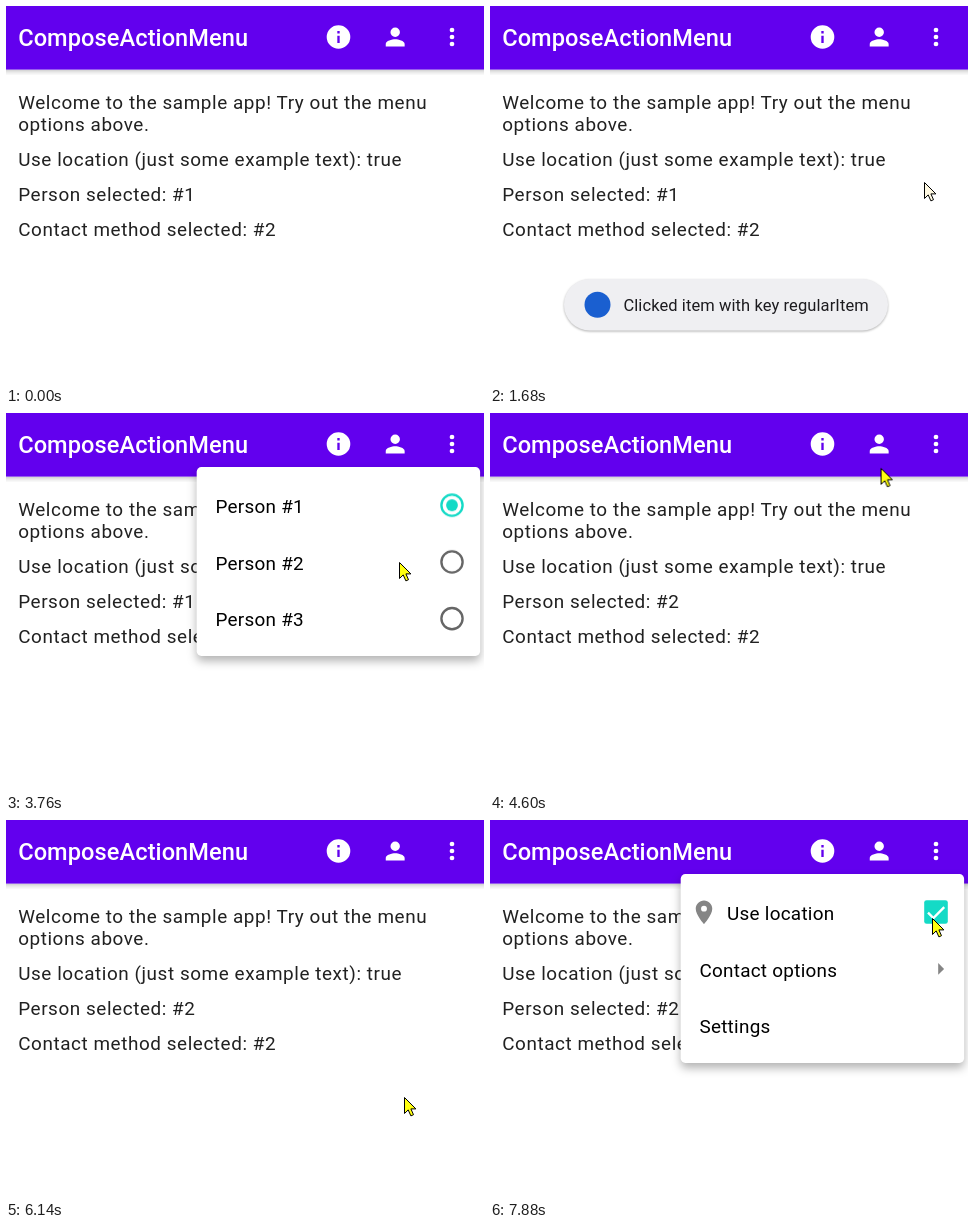
An HTML page for the animation above (8000 ms loop, 478x379 px).

```html
<!DOCTYPE html>
<html lang="en">
<head>
<meta charset="utf-8">
<title>Action menu demo</title>
<style>
  html, body { margin: 0; width: 100%; height: 100%; overflow: hidden; background: #fff; }
  svg { display: block; width: 478px; height: 379px; }

  text { font: 400 18.9px Roboto, sans-serif; letter-spacing: .27px; }
  .title { font-size: 23.6px; font-weight: 500; letter-spacing: .05px; fill: #fff; }
  .body text { letter-spacing: .57px; fill: #212121; }
  .toast text { font-size: 16.5px; letter-spacing: .09px; fill: #1c1b1f; }
  .panel { fill: #fff; filter: drop-shadow(0 5px 5px rgba(0, 0, 0, .3)); }

  /* One loop is 8 s, so 1% of a keyframe list is 80 ms. */
  .cursor, .toast, .menu, .halo, .glow { animation: 8s linear infinite; }
  .before, .after, .on1, .on2, .off1, .off2 { animation: 8s step-end infinite; }

  .cursor { animation-name: cursor; animation-timing-function: ease-in-out; }
  @keyframes cursor {
    0% { transform: translate(432px, 347px); opacity: 0; fill: #fff9e2; animation-timing-function: step-end; }
    .875% { transform: translate(432px, 347px); opacity: 1; }
    10%, 15.4% { transform: translate(328px, 27px); }
    20.6% { transform: translate(434px, 176px); }
    22.4% { transform: translate(434px, 176px); fill: #fff9e2; }
    22.6% { fill: #ffff10; }
    31.25% { transform: translate(385px, 33px); }
    34.5%, 42.25% { transform: translate(392px, 42.5px); }
    46.5%, 53.75% { transform: translate(393px, 149px); }
    59%, 61.2% { transform: translate(390px, 36px); }
    65.3%, 69% { transform: translate(396px, 217px); }
    73.25%, 77.25% { transform: translate(398px, 277px); }
    85%, 93.1% { transform: translate(443px, 32px); }
    97.75%, 100% { transform: translate(442px, 98px); opacity: 1; fill: #ffff10; }
  }

  .toast { opacity: 0; animation-name: toast; }
  @keyframes toast {
    0%, 13.6% { opacity: 0; }
    17%, 41.2% { opacity: 1; }
    45%, 100% { opacity: 0; }
  }

  .menu { opacity: 0; }
  .people { transform-origin: 389px 54px; animation-name: people; }
  @keyframes people {
    0%, 34% { opacity: 0; transform: scale(.8); }
    34.4% { opacity: 1; }
    35.5%, 52.25% { opacity: 1; transform: none; }
    53.2% { opacity: 0; transform: none; }
    53.3%, 60.75% { opacity: 0; transform: scale(.8); }
    61.15% { opacity: 1; }
    62.25%, 75.6% { opacity: 1; transform: none; }
    76.5%, 100% { opacity: 0; transform: none; }
  }
  .overflow { transform-origin: 474px 54px; animation-name: overflow; }
  @keyframes overflow {
    0%, 87.25% { opacity: 0; transform: scale(.8); }
    87.65% { opacity: 1; }
    88.75%, 100% { opacity: 1; transform: none; }
  }

  /* Selection moves from person 1 to person 2. */
  .before, .on1, .off2 { animation-name: leave; }
  .after, .on2, .off1 { animation-name: enter; }
  @keyframes leave { 0% { opacity: 1; } 52.25%, 100% { opacity: 0; } }
  @keyframes enter { 0% { opacity: 0; } 52.25%, 100% { opacity: 1; } }

  /* Ripples share one timeline and are delayed to their click. */
  .halo, .glow { opacity: 0; animation-delay: var(--at); transform-box: fill-box; transform-origin: center; }
  .halo { fill: #fff; animation-name: halo; }
  .glow { fill: url(#soft); animation-name: glow; }
  @keyframes halo {
    0%, .7% { opacity: 0; }
    2.4%, 5.7% { opacity: .12; }
    8.6%, 100% { opacity: 0; }
  }
  @keyframes glow {
    0% { opacity: 0; transform: scale(.35); }
    .8% { opacity: 1; transform: scale(.66); }
    2.6% { opacity: .5; transform: none; }
    4.7%, 100% { opacity: 0; transform: none; }
  }
</style>
</head>
<body>
<svg viewBox="0 0 478 379">
  <defs>
    <linearGradient id="edge" x2="0" y2="1">
      <stop stop-opacity=".2"/>
      <stop offset=".4" stop-opacity=".09"/>
      <stop offset="1" stop-opacity="0"/>
    </linearGradient>
    <radialGradient id="soft">
      <stop stop-color="#fff" stop-opacity=".32"/>
      <stop offset=".6" stop-color="#fff" stop-opacity=".23"/>
      <stop offset="1" stop-color="#fff" stop-opacity="0"/>
    </radialGradient>
    <circle id="ring" r="10.6" fill="none" stroke="#666" stroke-width="2.36"/>
    <g id="picked">
      <circle r="10.6" fill="none" stroke="#14dac6" stroke-width="2.36"/>
      <circle r="5.9" fill="#14dac6"/>
    </g>
    <rect id="panel" class="panel" x="190.7" y="54" width="283.4" height="188.9" rx="4.7"/>
  </defs>

  <g class="body">
    <text x="12.2" y="103">Welcome to the sample app! Try out the menu</text>
    <text x="12.2" y="125">options above.</text>
    <text x="12.2" y="160">Use location (just some example text): true</text>
    <text class="before" x="12.2" y="195">Person selected: #1</text>
    <text class="after" x="12.2" y="195">Person selected: #2</text>
    <text x="12.2" y="230">Contact method selected: #2</text>
  </g>

  <rect y="63.6" width="478" height="6" fill="url(#edge)"/>
  <rect width="478" height="63.6" fill="#6200ee"/>
  <text class="title" x="12.2" y="39.7">ComposeActionMenu</text>

  <g style="--at: .95s">
    <circle class="halo" cx="332.5" cy="31" r="28.3"/>
    <circle class="glow" cx="332.5" cy="31" r="28.3"/>
  </g>
  <g style="--at: 2.64s">
    <circle class="halo" cx="389.2" cy="31" r="28.3"/>
    <circle class="glow" cx="389.2" cy="31" r="28.3"/>
  </g>
  <g style="--at: 4.79s">
    <circle class="halo" cx="389.2" cy="31" r="28.3"/>
    <circle class="glow" cx="389.2" cy="31" r="28.3"/>
  </g>
  <g style="--at: 6.83s">
    <circle class="halo" cx="446" cy="31" r="28.3"/>
    <circle class="glow" cx="446" cy="31" r="28.3"/>
  </g>

  <g fill="#fff">
    <path transform="translate(332.5 31) scale(1.181)" fill-rule="evenodd"
      d="M0-10a10 10 0 1 0 0 20a10 10 0 1 0 0-20zM-1-1h2v6h-2zM-1-5h2v2h-2z"/>
    <path transform="translate(389.2 31) scale(1.181)"
      d="M0 0a4 4 0 1 0 0-8a4 4 0 1 0 0 8zM0 2c-2.67 0-8 1.34-8 4v2h16v-2c0-2.66-5.33-4-8-4z"/>
    <circle cx="446" cy="24" r="2.36"/>
    <circle cx="446" cy="31" r="2.36"/>
    <circle cx="446" cy="38" r="2.36"/>
  </g>

  <g class="toast">
    <rect x="74" y="273" width="324" height="51.5" rx="25.75" fill="#efeff2"
      style="filter: drop-shadow(0 1px 1px rgba(0, 0, 0, .3))"/>
    <circle cx="107.5" cy="298.7" r="13" fill="#1a5fd0"/>
    <text x="133.4" y="305">Clicked item with key regularItem</text>
  </g>

  <g class="menu people">
    <use href="#panel"/>
    <text x="209.4" y="100">Person #1</text>
    <text x="209.4" y="156.6">Person #2</text>
    <text x="209.4" y="213.3">Person #3</text>
    <use class="on1" href="#picked" x="446" y="92.2"/>
    <use class="off1" href="#ring" x="446" y="92.2"/>
    <use class="on2" href="#picked" x="446" y="148.9"/>
    <use class="off2" href="#ring" x="446" y="148.9"/>
    <use href="#ring" x="446" y="205.6"/>
  </g>

  <g class="menu overflow">
    <use href="#panel"/>
    <path transform="translate(214 92.2) scale(1.181)" fill="#858585" fill-rule="evenodd"
      d="M0-10c-3.87 0-7 3.13-7 7c0 5.25 7 13 7 13s7-7.75 7-13c0-3.87-3.13-7-7-7zM0-.5a2.5 2.5 0 1 1 0-5a2.5 2.5 0 1 1 0 5z"/>
    <text x="237" y="100">Use location</text>
    <text x="209.4" y="156.6">Contact options</text>
    <text x="209.4" y="213.3">Settings</text>
    <rect x="434.2" y="80.2" width="23.6" height="23.6" rx="2.4" fill="#14dac6"/>
    <path d="M438 92.6l5.4 5.4l10.8-10.8" fill="none" stroke="#fff" stroke-width="2.36"/>
    <path d="M448.2 143l5.9 5.9l-5.9 5.9z" fill="#858585"/>
  </g>

  <path class="cursor" stroke="#000"
    d="M.5.5v16l3.7-3.6l2.7 6l2.6-1.2l-2.6-5.8h5z"/>
</svg>
</body>
</html>
```
